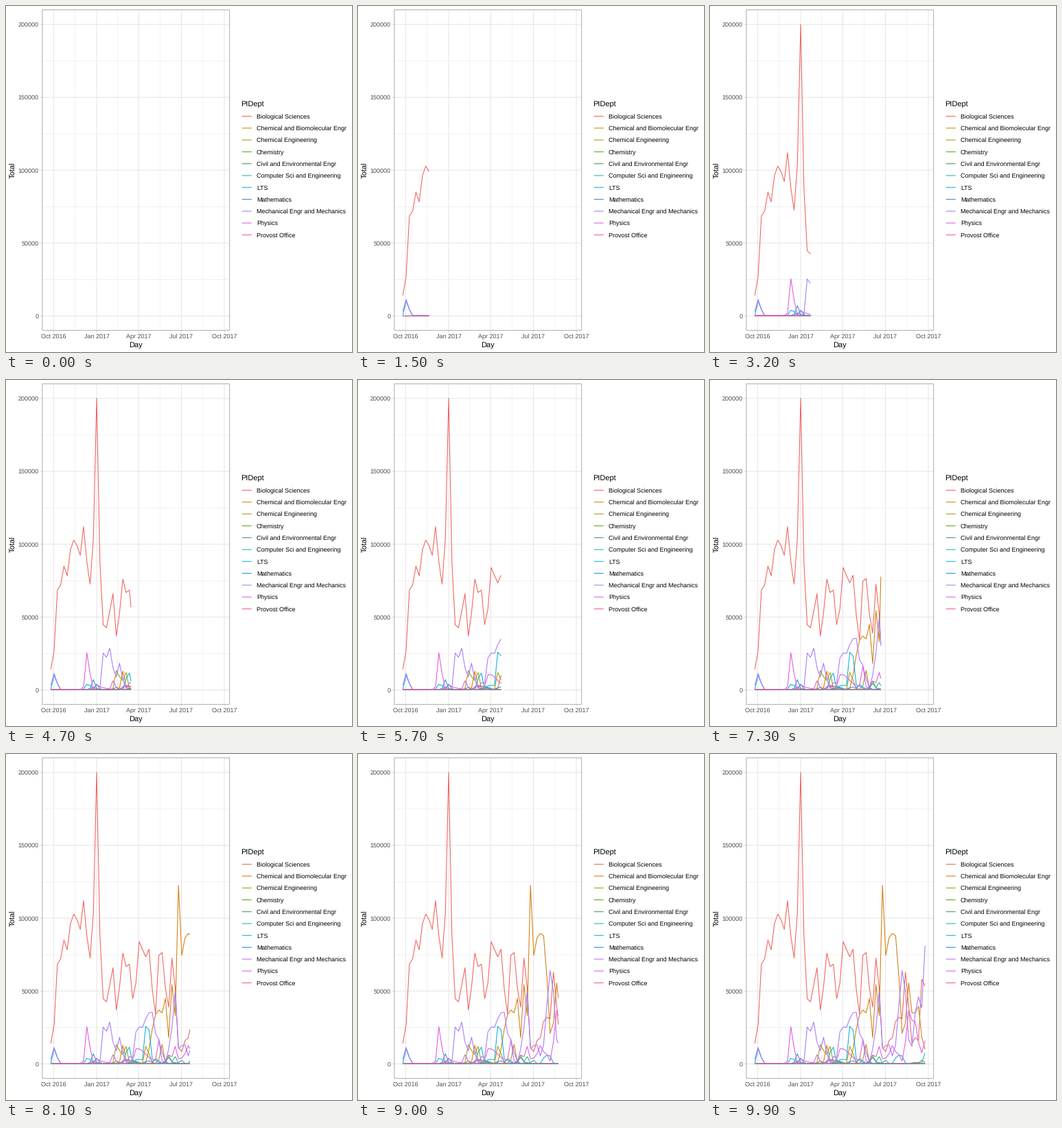
Write a matplotlib script that moves like this. It is 504 px wide and 504 px high and loops after 10 s.

```python
import numpy as np
import matplotlib.pyplot as plt
from matplotlib.animation import FuncAnimation
from matplotlib.patches import Rectangle

SIZE, DPI = 504, 72
FRAMES, INTERVAL = 100, 100
WEEKS = np.arange(53)
LEFT, RIGHT, TOP, BOTTOM = 52.9, 325.6, 5.6, 472.5
GRID, BORDER = "#dedede", "#b3b3b3"

plt.rcParams.update({
    "font.family": "Liberation Sans",
    "text.hinting": "none",
    "text.hinting_factor": 1,
})


def day_x(day):
    """Pixel position of a day counted from 25 Sep 2016."""
    return 65.3 + 0.6811 * day


def total_y(thousands):
    return 451.4 - 2.1225 * np.asarray(thousands, dtype=float)


def weekly(start, *values, into=None):
    """Weekly totals in thousands, near zero outside the given run."""
    out = np.full(len(WEEKS), 0.3) if into is None else into
    out[start:start + len(values)] = values
    return out


biology = weekly(
    0, 14, 27, 68.5, 72, 85, 78.3, 96.3, 102.8, 99, 92.3, 112, 88, 72.6,
    104, 200, 87.5, 44.7, 42.6, 54, 66, 37, 53, 76, 66.8, 68.5, 44.8,
    55.5, 84, 78.5, 73.5, 78.7, 51, 34.2, 74.5, 76.5, 52, 39, 72.5, 52,
    11, 8.5, 16, 18, 29, 32, 31, 63, 40, 14, 18, 16, 58, 53.5)

biomolecular = weekly(21, 1.5, 12.8, 2.5)
weekly(29, 1, 10, 24, 34, 37, 35, 45, 18, 54.5, 33, 122.5, 74.5, 86.5,
       89.5, 88, 60, 21, 28, 55.5, 35, 35, 39.5, 18.5, 10,
       into=biomolecular)

chem_eng = weekly(19, 1, 13.3, 9, 6.5, 12, 1)
weekly(29, 12, 7, 1, 0.4, 3, 13.3, 1, into=chem_eng)

chemistry = weekly(22, 1.5, 2.8, 2.6, 2, 1)
weekly(35, 2, 6, 1.5, 0.5, into=chemistry)
weekly(50, 0.6, 2.5, 1, into=chemistry)

civil = weekly(19, 0.4, 2, 0.5)
weekly(25, 2.6, 1, 0.5, into=civil)
weekly(48, 0.6, 1, 0.8, into=civil)

computing = weekly(13, 2, 0.5)
weekly(35, 1, 4.5, 1.5, 5, 0.6, 2.5, 0.4, into=computing)

lts = weekly(0, 0.5, 10.3, 4.3)
weekly(10, 0.5, 3.8, 3, 0.5, 4, 0.8, into=lts)
weekly(22, 0.5, 8, 11.5, 0.5, 3, 3, 3, 25.8, 23.3, 3.5, 2.5, 1, into=lts)
weekly(43, 4, 6, 5.5, 0.6, into=lts)
weekly(51, 0.8, 7.5, into=lts)

maths = weekly(12, 1, 7, 1)
weekly(26, 2, 0.8, 0.5, 1.5, 2, 1, 3.5, 2, 0.5, 1.8, into=maths)

mechanics = weekly(0, 3, 11.3, 4.5)
weekly(15, 1, 25.3, 22.4, 28.6, 15, 9, 18.3, 7, 1, 5, 4.5, 22, 25.3, 25,
       31, 35, 35.5, 20.5, 17, 2, 1.2, 10, 25, 50, 10.5, 12.5, 13, 5.5,
       13, 40, 64, 50, 16.5, 12, 35, 46, 38.5, 81, into=mechanics)

physics = weekly(
    10, 2, 25.5, 11, 0.5, 3.5, 2.2, 1.6, 1, 0.8, 6.3, 2, 0.5, 2, 3, 2, 2.5,
    10.3, 10.3, 9, 6.5, 4.5, 2, 3, 16, 8, 2, 6, 5, 12, 3.5, 4, 7, 12.5,
    8.5, 6.5, 2, 15, 36.5, 30, 29, 15, 7.5, 16)

provost = weekly(22, 0.5, 0.4, 1.2, 0.6)
weekly(37, 0.6, 1, 0.5, into=provost)

SERIES = [
    ("Biological Sciences", "#f1635c", biology),
    ("Chemical and Biomolecular Engr", "#d27f10", biomolecular),
    ("Chemical Engineering", "#a59a12", chem_eng),
    ("Chemistry", "#5fa812", chemistry),
    ("Civil and Environmental Engr", "#3c9c5c", civil),
    ("Computer Sci and Engineering", "#1ab996", computing),
    ("LTS", "#0bb0d8", lts),
    ("Mathematics", "#2b93d6", maths),
    ("Mechanical Engr and Mechanics", "#a478ff", mechanics),
    ("Physics", "#df5ae0", physics),
    ("Provost Office", "#ea5f92", provost),
]

fig = plt.figure(figsize=(SIZE / DPI, SIZE / DPI), dpi=DPI, facecolor="white")
ax = fig.add_axes([0, 0, 1, 1])
ax.set(xlim=(0, SIZE), ylim=(SIZE, 0))
ax.axis("off")


def rule(xs, ys, color, width, z=1):
    ax.plot(xs, ys, color=color, lw=width, zorder=z, snap=False,
            solid_capstyle="butt")


def label(x, y, text, size=8.8, color="black", **kw):
    ax.text(x, y, text, fontsize=size, color=color, va="baseline", **kw)


def draw_panel():
    for day in (52, 143, 233.5, 325):
        rule([day_x(day)] * 2, [TOP, BOTTOM], GRID, 0.4)
    for total in (25, 75, 125, 175):
        rule([LEFT, RIGHT], [total_y(total)] * 2, GRID, 0.4)

    months = ("Oct 2016", "Jan 2017", "Apr 2017", "Jul 2017", "Oct 2017")
    for day, month in zip((6, 98, 188, 279, 371), months):
        x = day_x(day)
        rule([x, x], [TOP, BOTTOM], GRID, 0.8)
        rule([x, x], [BOTTOM, BOTTOM + 2.75], BORDER, 0.6)
        label(x, 484.3, month, color="#4d4d4d", ha="center")
    for total in range(0, 201, 50):
        y = total_y(total)
        rule([LEFT, RIGHT], [y, y], GRID, 0.8)
        rule([LEFT - 2.75, LEFT], [y, y], BORDER, 0.6)
        label(47.8, y + 3.3, str(total * 1000), color="#4d4d4d", ha="right")

    ax.add_patch(Rectangle((LEFT, TOP), RIGHT - LEFT, BOTTOM - TOP, fill=False,
                           ec=BORDER, lw=1.07, zorder=4, snap=False))
    label(189.2, 497, "Day", 11, ha="center")
    label(13.5, 239.2, "Total", 11, ha="center", rotation=90,
          rotation_mode="anchor")


def draw_legend():
    label(342, 146.2, "PIDept", 11)
    for i, (name, color, _) in enumerate(SERIES):
        y = 160.6 + 17.28 * i
        rule([343.8, 357.7], [y, y], color, 1.07)
        label(364.8, y + 3.4, name)


draw_panel()
draw_legend()
lines = [ax.plot([], [], color=color, lw=1.07, zorder=3,
                 solid_capstyle="butt", solid_joinstyle="round")[0]
         for _, color, _ in SERIES]

# Each week lands on a whole frame; lines grow evenly in between.
STOPS = np.round(WEEKS * (FRAMES - 1) / WEEKS[-1])


def update(frame):
    now = np.interp(frame, STOPS, WEEKS)
    weeks = np.append(WEEKS[WEEKS < now], now)
    if frame == 0:
        weeks = weeks[:0]
    for line, (_, _, totals) in zip(lines, SERIES):
        line.set_data(day_x(7 * weeks),
                      total_y(np.interp(weeks, WEEKS, totals)))
    return lines


anim = FuncAnimation(fig, update, frames=FRAMES, interval=INTERVAL,
                     repeat=True, repeat_delay=0)
plt.show()
```
